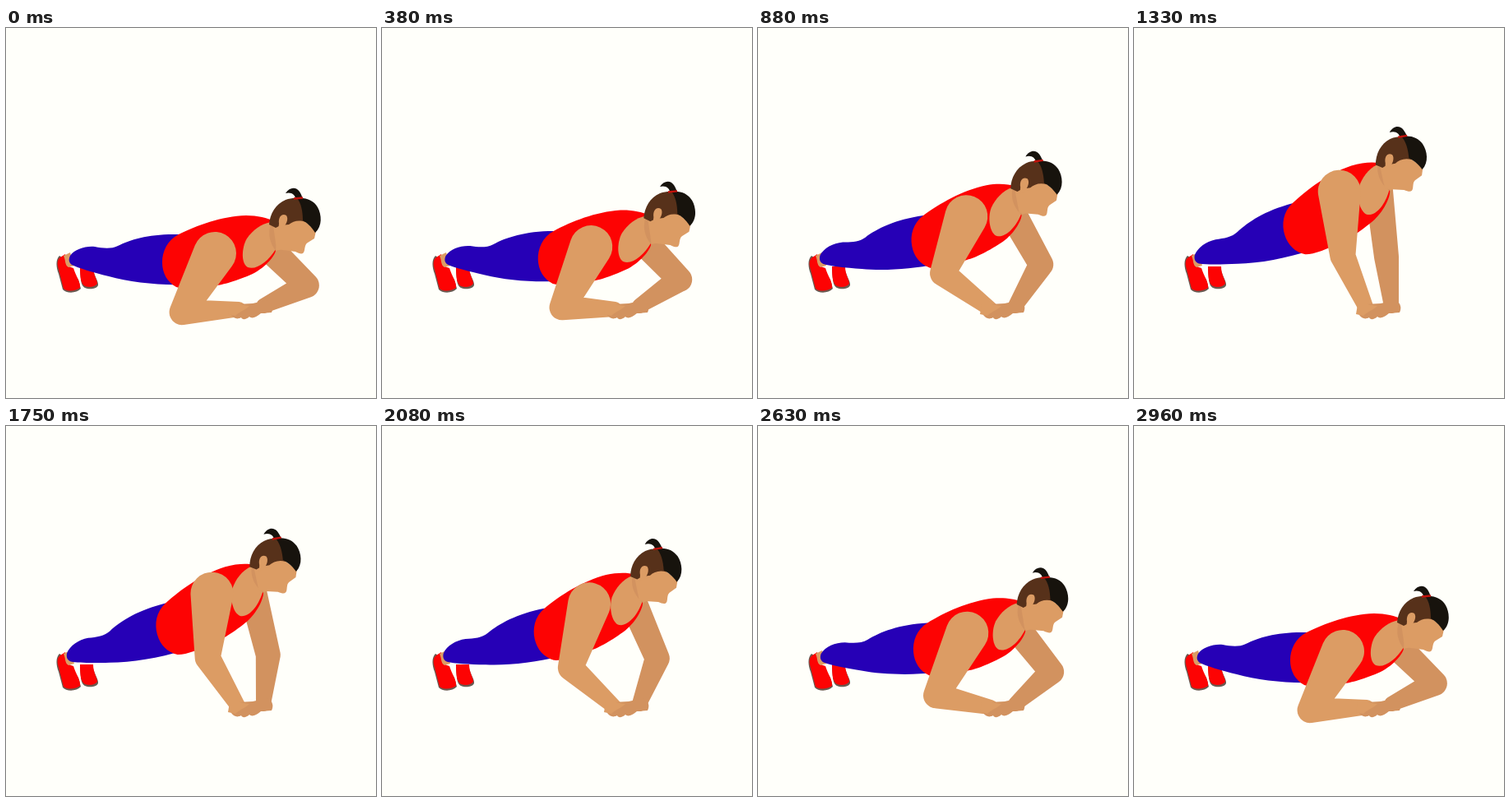
Write an HTML page that moves like this. It is 450 px wide and 450 px high and loops after 3 s.

```html
<!DOCTYPE html>
<html lang="en">
<head>
<meta charset="utf-8">
<title>Push-up</title>
<style>
  html, body { margin: 0; width: 100%; height: 100%; overflow: hidden; background: #fffffa; }
  svg { display: block; width: 100vw; height: 100vh; }
  .skin { fill: #dc9c64; }
  .shade { fill: #d2925f; }
  .red { fill: #fd0303; }
  .sole { fill: #6b5a50; }
</style>
</head>
<body>
<svg viewBox="0 0 450 450">
  <g id="shoes">
    <path class="sole" d="M90 291L105 290C106 300 113 308 112 313C110 318 100 318 96 316C91 313 91 308 90 291Z"/>
    <path class="red" d="M90 290L106 290C106 300 111 306 111 311C108 315 102 316 96 314C91 311 90 304 90 290Z"/>
    <path class="sole" d="M65 277C60 282 61 291 64 299L69 318C73 323 86 323 91 317L88 306L70 280Z"/>
    <path class="red" d="M66 279L72 275L76 290L82 292C85 302 91 309 90 316C85 320 75 321 70 317L63 290C62 285 63 281 66 279Z"/>
    <path class="skin" d="M70 277L78 273L83 289L76 291C71 288 73 283 70 277Z"/>
  </g>
  <g class="body">
    <path fill="#2600b6" d="M78 277C84 269 96 265 108 266C118 268 128 269 136 265C152 257 175 250 210 251L215 312C185 313 150 309 125 302C105 297 88 292 80 288C76 285 76 281 78 277Z"/>
  </g>
  <path id="farArm" class="shade"/>
  <g class="body">
    <path class="red" d="M210 251C232 240 262 229 292 228C306 228 318 231 326 235L328 270C328 276 316 291 300 299C282 307 262 313 255 313C235 317 215 318 207 315C196 309 190 298 190 285C190 272 196 258 210 251Z"/>
    <path class="skin" d="M323 236C310 238 300 246 293 256C286 268 286 287 294 291C304 295 319 284 328 269Z"/>
    <path class="skin" d="M321 236L345 238L348 266L328 271Z"/>
    <path class="shade" d="M322 239L331 241L328 271C321 262 318 250 322 239Z"/>
    <g id="head">
      <path class="skin" d="M338 226L360 232L377 247L375 256L367 261C364 263 364 265 363 270C362 276 358 275 352 272L329 269L325 240Z"/>
      <path fill="#57311a" d="M320 239C321 226 328 214 340 209C348 206 356 207 360 208L364 236C356 233 349 235 344 239L334 240L328 243Z"/>
      <path class="skin" d="M332 238C331 229 336 225 341 228C344 232 341 239 337 243L331 246Z"/>
      <path fill="#17130d" d="M354 207C366 206 374 210 379 218C384 227 385 241 376 249C371 241 366 237 361 234C361 223 359 213 354 207Z"/>
      <path fill="#17130d" d="M340 201C345 193 353 193 357 199C359 202 360 205 361 208L352 208C352 203 347 199 340 201Z"/>
      <path fill="none" stroke="#c3120c" stroke-width="2.4" d="M350 207.500L361 206.500"/>
    </g>
  </g>
  <path id="nearArm" class="skin"/>
  <path class="shade" d="M274 349C272 345 275 338 282 336L300 335L318 331C324 334 326 340 323 346L310 347C304 352 299 354 296 351C292 355 287 355 286 352C281 355 277 353 274 349Z"/>
  <path class="skin" d="M270 348L272 336L284 336L296 338C291 343 284 345 279 350Z"/>
</svg>
<script>
const LOOP = 3000, FPS = 24, RAD = Math.PI / 180;
const FOOT = [74, 291];

// time, body lift, near forearm angle, near forearm length, far forearm angle
const KEYS = [
  [0, 0, -3, 69, 24],
  [60, 0, -3, 69, 24],
  [377, 1.75, 2, 64, 32],
  [580, 4.7, 12, 66, 40],
  [877, 10, 37, 73, 57],
  [1130, 15.2, 56, 72, 80],
  [1333, 17, 66.5, 71, 96],
  [1380, 17, 66.5, 71, 96],
  [1690, 16.1, 60, 71, 86],
  [2083, 12.4, 39.5, 72, 65],
  [2212, 10.7, 32, 71, 58],
  [2627, 4.9, 12, 68, 40],
  [2750, 2.9, 6, 68, 33],
  [2958, 0, -3, 69, 24],
  [3000, 0, -3, 69, 24]
];

const slope = (i, c) => (KEYS[i + 1][c] - KEYS[i][c]) / (KEYS[i + 1][0] - KEYS[i][0]);

function tangent(i, c) {
  if (i === 0 || i === KEYS.length - 1) return 0;
  const a = slope(i - 1, c), b = slope(i, c);
  return a * b > 0 ? 2 * a * b / (a + b) : 0;
}

// Monotone cubic through the key values
function value(t, c) {
  let i = 0;
  while (i < KEYS.length - 2 && t >= KEYS[i + 1][0]) i++;
  const a = KEYS[i], b = KEYS[i + 1], h = b[0] - a[0];
  const u = (t - a[0]) / h, v = 1 - u;
  return v * v * ((1 + 2 * u) * a[c] + u * h * tangent(i, c))
       + u * u * ((1 + 2 * v) * b[c] - v * h * tangent(i + 1, c));
}

function lifted(x, y, deg) {
  const s = Math.sin(deg * RAD), c = Math.cos(deg * RAD);
  const dx = x - FOOT[0], dy = y - FOOT[1];
  return [FOOT[0] + dx * c + dy * s, FOOT[1] - dx * s + dy * c];
}

const polar = (x, y, r, a) => [x + r * Math.cos(a), y + r * Math.sin(a)];
const pair = p => p.map(n => n.toFixed(2)).join(" ");

// Outline around two circles [x, y, r]
function taper([ax, ay, ar], [bx, by, br]) {
  const dir = Math.atan2(by - ay, bx - ax);
  const open = Math.acos((ar - br) / Math.hypot(bx - ax, by - ay));
  const wide = open < Math.PI / 2 ? 1 : 0;
  return `M${pair(polar(ax, ay, ar, dir + open))}`
    + `A${ar} ${ar} 0 ${wide} 1 ${pair(polar(ax, ay, ar, dir - open))}`
    + `L${pair(polar(bx, by, br, dir - open))}`
    + `A${br} ${br} 0 ${1 - wide} 1 ${pair(polar(bx, by, br, dir + open))}Z`;
}

const arm = (shoulder, elbow, wrist) => taper(shoulder, elbow) + taper(elbow, wrist);

const bodies = document.querySelectorAll(".body");
const [head, nearArm, farArm] = ["head", "nearArm", "farArm"].map(id => document.getElementById(id));

function draw(t) {
  const [lift, nearAngle, nearLength, farAngle] = [1, 2, 3, 4].map(c => value(t, c));

  for (const g of bodies) g.setAttribute("transform", `rotate(${-lift} ${FOOT})`);
  head.setAttribute("transform", `rotate(${lift * 0.73} 335 240)`);

  const [sx, sy] = lifted(254, 274, lift);
  nearArm.setAttribute("d", arm(
    [sx + lift * 0.5, sy - lift * 1.4, 26],
    [...polar(283, 342, nearLength, (180 + nearAngle) * RAD), 15.5],
    [283, 342, 9]
  ));
  farArm.setAttribute("d", arm(
    [...lifted(316, 264, lift), 17],
    [...polar(312, 337, 59, -farAngle * RAD), 15],
    [313, 338, 9]
  ));
}

const start = performance.now();
function tick() {
  const t = (performance.now() - start) % LOOP;
  draw(Math.floor(t * FPS / 1000) * 1000 / FPS);
  requestAnimationFrame(tick);
}
tick();
</script>
</body>
</html>
```
